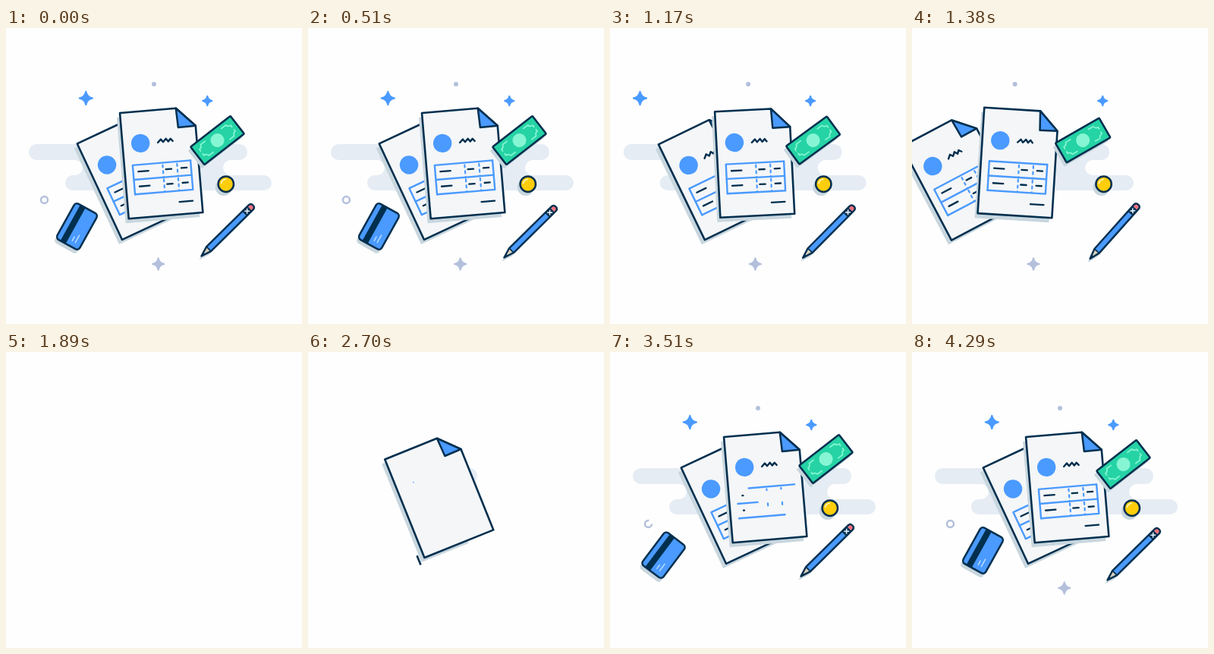
Animation of 390x390 px, one loop 4.32 s. Source, as an HTML page with a canvas:

```html
<!DOCTYPE html>
<html lang="en">
<head>
<meta charset="utf-8">
<title>Invoice</title>
<style>
html, body { margin: 0; width: 100%; height: 100%; overflow: hidden; background: #fefefe; }
canvas { display: block; width: 390px; height: 390px; }
</style>
</head>
<body>
<canvas id="stage"></canvas>
<script>
const LOOP = 4320, GONE = 1890, ENTER = 2310;
const NAVY = '#012f4e', BLUE = '#4a9aff', PAPER = '#f4f6f8', SHADE = '#c8d6de',
      CLOUD = '#e5ecf4', GREY = '#b3c0dc', GREEN = '#25d3a5', MINT = '#86f5d3';
const canvas = document.getElementById('stage');
const c = canvas.getContext('2d');
const dpr = window.devicePixelRatio || 1;
canvas.width = canvas.height = 390 * dpr;

const clamp = v => Math.max(0, Math.min(1, v));
const span = (t, a, b) => clamp((t - a) / (b - a));
const smooth = (t, a, b) => { const p = span(t, a, b); return p * p * (3 - 2 * p); };
const pop = (t, a, b) => {
  const p = span(t, a, b);
  return p === 0 ? 0 : 1 + 2.7 * (p - 1) ** 3 + 1.7 * (p - 1) ** 2;
};

// Accelerating slide: dist is reached at 1380 ms.
const leave = (t, start, dist) =>
  t > start && t < ENTER ? dist * ((t - start) / (1380 - start)) ** 4 : 0;
// Scale of a part that pops in during the second half of the loop.
const appear = (t, a, b) => t < GONE ? 1 : pop(t, a, b);
// Share of a line drawn so far.
const drawn = (t, a, b) => t < GONE ? 1 : smooth(t, a, b);

// Smooth curve through rows of [time, ...values].
function track(t, rows) {
  const last = rows.length - 1;
  if (t <= rows[0][0]) return rows[0].slice(1);
  if (t >= rows[last][0]) return rows[last].slice(1);
  const i = rows.findIndex(r => r[0] > t) - 1;
  const a = rows[i], b = rows[i + 1], h = b[0] - a[0], s = (t - a[0]) / h;
  const slope = (n, k) => n === 0 || n === last ? 0 :
    (rows[n + 1][k] - rows[n - 1][k]) / (rows[n + 1][0] - rows[n - 1][0]);
  return a.slice(1).map((v, j) => {
    const k = j + 1;
    return (2 * s ** 3 - 3 * s * s + 1) * v + (s ** 3 - 2 * s * s + s) * h * slope(i, k)
      + (3 * s * s - 2 * s ** 3) * b[k] + (s ** 3 - s * s) * h * slope(i + 1, k);
  });
}

function at(x, y, deg, scale, draw) {
  if (scale <= 0) return;
  c.save();
  c.translate(x, y);
  c.rotate(deg * Math.PI / 180);
  c.scale(scale, scale);
  draw();
  c.restore();
}
function paint(fill, stroke, width = 2.5) {
  if (fill) { c.fillStyle = fill; c.fill(); }
  if (stroke) { c.strokeStyle = stroke; c.lineWidth = width; c.stroke(); }
}
function poly(points, closed = true) {
  c.beginPath();
  points.forEach(([x, y]) => c.lineTo(x, y));
  if (closed) c.closePath();
}
function box(x, y, w, h, r = 0) {
  c.beginPath();
  c.roundRect(x, y, w, h, r);
}
function disc(x, y, r, fill, stroke, width) {
  c.beginPath();
  c.arc(x, y, r, 0, Math.PI * 2);
  paint(fill, stroke, width);
}
function line(x1, y1, x2, y2, p, color, width) {
  if (p <= 0) return;
  poly([[x1, y1], [x1 + (x2 - x1) * p, y1 + (y2 - y1) * p]], false);
  paint(null, color, width);
}
function trace(length, p, color, width) {
  if (p <= 0) return;
  c.save();
  if (p < 1) c.setLineDash([length * p, length * 2]);
  paint(null, color, width);
  c.restore();
}

function cloud(t) {
  const g = t < GONE ? 1 : track(t, [[2600, 0], [2700, .19], [2820, .6], [3060, 1.02], [3240, 1]])[0];
  if (g <= 0) return;
  const X = x => 190 + (x - 190) * g, q = Math.PI / 2;
  c.save();
  c.translate(-leave(t, 725, 57.5), 0);
  c.beginPath();
  c.arc(X(307.5), 163.5, 10.5, -q, q);
  c.arc(X(296), 184, 10, -q, q, true);
  c.arc(X(340), 204, 10, -q, q);
  c.arc(X(88), 204, 10, q, -q);
  c.arc(X(91), 184, 10, q, -q, true);
  c.arc(X(40.5), 163.5, 10.5, q, -q);
  c.closePath();
  paint(CLOUD);
  c.restore();
}

function star(x, y, r, color, scale) {
  at(x, y, 0, scale, () => {
    const k = r * .14, e = r - 1;
    c.beginPath();
    c.moveTo(0, -e);
    c.quadraticCurveTo(k, -k, e, 0);
    c.quadraticCurveTo(k, k, 0, e);
    c.quadraticCurveTo(-k, k, -e, 0);
    c.quadraticCurveTo(-k, -k, 0, -e);
    c.closePath();
    paint(color, color, 2);
  });
}

const W = 98, H = 139.7;
function sheet(x, y, deg, t, o) {
  const edge = drawn(t, o.edge, o.edge + o.edgeTime);
  if (edge <= 0) return;
  const fill = drawn(t, o.fill, o.fill + 110);
  const shade = t < GONE ? 1 : track(t, [[o.fill, 0], [o.fill + 290, .68], [o.fill + 420, 1]])[0];
  const shape = (w = W) => poly([[0, H], [0, 0], [Math.min(w, 74), 0], [Math.min(w, W), 25], [Math.min(w, W), H]]);
  const inSheet = draw => at(x, y, deg, 1, () => { c.translate(-W / 2, -H / 2); draw(); });
  if (shade > 0) {
    c.save();
    c.translate(-4, 6);
    inSheet(() => { shape(W * shade); paint(SHADE); });
    c.restore();
  }
  inSheet(() => {
    c.globalAlpha = fill;
    shape();
    paint(PAPER);
    c.globalAlpha = 1;
    shape();
    trace(445, edge, NAVY, 2.6);
    c.globalAlpha = fill;
    poly([[74, 0], [W, 25], [75, 25.4]]);
    paint(BLUE, NAVY);
    c.globalAlpha = 1;

    c.lineCap = 'round';
    at(23.7, 42, 0, appear(t, o.mark, o.mark + 260), () => disc(0, 0, 12.2, BLUE));
    poly([[46.6, 43], [50.8, 39], [53.6, 42.8], [57.6, 38.7], [60.4, 42.8], [63.6, 39.2], [66.3, 42.6]], false);
    trace(36, drawn(t, o.mark + 220, o.mark + 500), NAVY, 2.4);
    table(t, o.table);
    line(68.5, 123.3, 86, 123.3, drawn(t, o.table + 440, o.table + 760), NAVY, 2.3);
  });
}
function table(t, s) {
  const p = drawn(t, s, s + 330);
  poly([[87.5, 70], [11, 70], [11, 108.6]], false);
  trace(115, p, BLUE, 2.4);
  poly([[11, 108.6], [87.5, 108.6], [87.5, 70]], false);
  trace(115, p, BLUE, 2.4);
  line(11, 89.3, 87.5, 89.3, drawn(t, s + 35, s + 380), BLUE, 2.4);
  c.save();
  c.setLineDash([3, 4.8]);
  for (const x of [50.4, 69.4]) {
    line(x, 73, x, 89, drawn(t, s + 110, s + 430), BLUE, 2.2);
    line(x, 92, x, 108, drawn(t, s + 50, s + 370), BLUE, 2.2);
  }
  c.restore();
  [[17.8, 31.2], [54.2, 61.6], [74.6, 81.8]].forEach(([a, b], i) => {
    for (const y of [79, 98.6])
      line(a, y, b, y, drawn(t, s + 125 + i * 120, s + 400 + i * 120), NAVY, 2.3);
  });
}

function card(t) {
  const out = leave(t, 400, 354);
  let [x, y, turn] = [93.5 - out, 261.5, Math.min(40, out * .45)];
  if (t > ENTER) [x, y, turn] = track(t, [[2850, 135, 235, 0], [3050, 55, 270, 11],
    [3360, 58, 269, 10], [3510, 70.5, 267.7, 8], [3900, 92, 261.7, 1], [4200, 93.5, 261.5, 0]]);
  const size = appear(t, 2850, 3030), deg = turn - 61;
  const shape = () => box(-27, -17, 54, 34, 4.5);
  at(x - 3, y + 5, deg, size, () => { shape(); paint(SHADE); });
  at(x, y, deg, size, () => {
    shape();
    paint(BLUE);
    c.fillStyle = NAVY;
    c.fillRect(-26.5, -10, 53, 8);
    shape();
    paint(null, NAVY);
    line(-20, 3.7, -13, 3.7, 1, '#b9dcff', 1.5);
    line(-20, 8.3, -8, 8.3, 1, '#b9dcff', 1.5);
  });
}

function money(t) {
  const out = leave(t, 740, 53);
  let [dx, dy] = [-out, 0];
  if (t > ENTER) [dx, dy] = track(t, [[2705, -35, 24], [2810, 13, -15], [3200, 10, -11],
    [3510, 6, -7], [3870, 0, 0]]);
  const x = 278.5 + dx, y = 148 + dy, deg = -37.8 + Math.min(25, out * .15);
  const size = appear(t, 2705, 2810);
  at(x - 3, y + 5, deg, size, () => { box(-33.5, -15, 67, 30, 1); paint(SHADE); });
  at(x, y, deg, size, () => {
    box(-33.2, -14.8, 66.4, 29.6, 1);
    paint(GREEN, NAVY, 2.6);
    disc(0, 0, 9, MINT);
    for (const s of [-1, 1]) for (const v of [-1, 1]) {
      c.beginPath();
      c.moveTo(s * 13, v * 9);
      c.lineTo(s * 21, v * 9);
      c.quadraticCurveTo(s * 22, v * 5, s * 26, v * 5);
      c.lineTo(s * 26, v * 1.5);
      paint(null, MINT, 1.7);
    }
  });
}

function coin(t) {
  const x = 289.8 - leave(t, 700, 37), size = appear(t, 2880, 3180);
  at(x - 3, 210, 0, size, () => disc(0, 0, 11, SHADE));
  at(x, 205.7, 0, size, () => {
    disc(0, 0, 10.2, '#ffcd0a', NAVY);
    c.beginPath();
    c.arc(0, 0, 6.3, Math.PI * 1.03, Math.PI * 1.5);
    paint(null, '#fff4c4', 1.8);
  });
}

function pencil(t) {
  const out = leave(t, 775, 26), drift = smooth(t, 0, 560);
  let [dx, dy] = [drift - out, 2 * drift - Math.min(3, out * .03)];
  if (t > ENTER) [dx, dy] = track(t, [[2850, -70, -60], [3060, -4, -3], [3300, -8, -7],
    [3510, -6, -5], [3880, 5, 4], [4290, 0, 0]]);
  const x = 292 + dx, y = 266.5 + dy, deg = -44.6 - Math.min(12, out * .14);
  const size = appear(t, 2850, 3040);
  const shape = () => {
    c.beginPath();
    c.moveTo(-48.5, 0);
    c.lineTo(-35, -4.2);
    c.lineTo(43, -4.2);
    c.quadraticCurveTo(47, -4.2, 47, 0);
    c.quadraticCurveTo(47, 4.2, 43, 4.2);
    c.lineTo(-35, 4.2);
    c.closePath();
  };
  at(x - 3, y + 5, deg, size, () => { shape(); paint(SHADE); });
  at(x, y, deg, size, () => {
    c.save();
    shape();
    c.clip();
    for (const [from, to, color] of [[-50, -43, NAVY], [-43, -35, '#d9cfbd'], [-35, 31, BLUE],
      [31, 41, NAVY], [41, 50, '#f1727f']]) {
      c.fillStyle = color;
      c.fillRect(from, -5, to - from, 10);
    }
    c.restore();
    line(33.5, -2.4, 38.5, 2.4, 1, '#e9f3ff', 1.6);
    line(33.5, 2.4, 38.5, -2.4, 1, '#e9f3ff', 1.6);
    line(-35, -4.2, -35, 4.2, 1, NAVY, 1.7);
    shape();
    paint(null, NAVY, 2.4);
  });
}

const FRONT = { edge: 2310, edgeTime: 270, fill: 2410, mark: 2697, table: 3340 };
const BACK = { edge: 2670, edgeTime: 300, fill: 2750, mark: 2790, table: 3170 };

function papers(t) {
  const gone = leave(t, 612, 104.5);
  const swing = t > ENTER ? 1 - smooth(t, 2700, 2860) : 0;
  sheet(167.8 - gone, 194.9 + 2.5 * swing, -25.1 - Math.min(10, gone * .026) + 3.1 * swing, t, BACK);
  const out = leave(t, 720, 64.5);
  let [x, y, deg] = [204.7 - out, 177.5, -4.8 + Math.min(25, out * .129)];
  if (t > ENTER) [x, y, deg] = track(t, [[2600, 167.8, 194.9, -25.1], [2700, 172.7, 188, -22],
    [2760, 186, 182.5, -14.5], [2820, 199, 178.5, -7.8], [2890, 204.7, 177.5, -4.8]]);
  sheet(x, y, deg, t, FRONT);
}

function specks(t) {
  star(105.3 - leave(t, 450, 182), 92.5, 9.7, BLUE, appear(t, 2940, 3300));
  star(265.3 - leave(t, 923, 14), 96, 7.2, BLUE, appear(t, 3060, 3450));
  star(200.7 - leave(t, 700, 40.5), 311, 8.7, GREY, appear(t, 3600, 4050));
  at(195 - leave(t, 720, 59), 74, 0, appear(t, 2970, 3270), () => disc(0, 0, 3, GREY));
  c.beginPath();
  const x = 50.5 - leave(t, 400, 325);
  c.arc(x, 226.5, 4.5, 0, Math.PI * 2);
  trace(28.3, drawn(t, 3340, 3590), GREY, 2.5);
}

function render(t) {
  c.setTransform(dpr, 0, 0, dpr, 0, 0);
  c.fillStyle = '#fefefe';
  c.fillRect(0, 0, 390, 390);
  if (t >= GONE && t < ENTER) return;
  c.lineCap = 'butt';
  c.lineJoin = 'round';
  cloud(t);
  specks(t);
  card(t);
  pencil(t);
  papers(t);
  money(t);
  coin(t);
}

const begin = performance.now();
function tick() {
  render((performance.now() - begin) % LOOP);
  requestAnimationFrame(tick);
}
tick();
</script>
</body>
</html>
```
